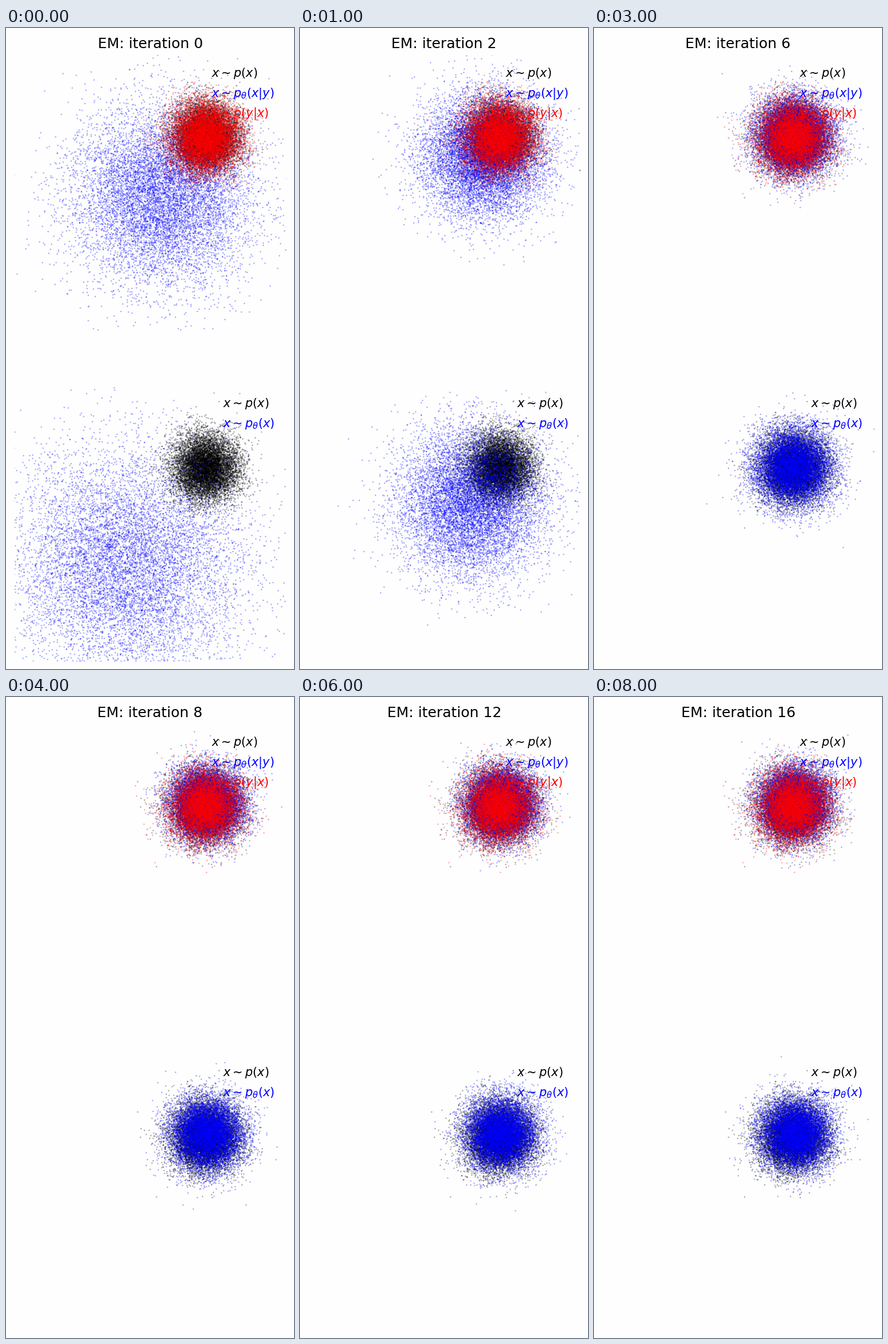
Recreate the animation shown at these times as a matplotlib script. Size 502x1116 px, loop 8500 ms.

```python
import numpy as np
import matplotlib.pyplot as plt
from matplotlib.animation import FuncAnimation

W, H, DPI = 502, 1116, 64
PT = 72 / DPI  # points per pixel
LEFT, RIGHT, PANEL_H = 15, 488, 480
TOP, SHIFT = 47, 575  # first panel's upper edge, offset of the second panel
FRAMES, STEP_MS, N = 17, 500, 10000
CENTER, SPREAD, NOISE = np.array([347, 190]), 29, 7

# Where the fitted clouds settle, and how far off each one starts
FIT_CENTER, FIT_SPREAD = np.array([351, 185]), 30.5
POSTERIOR_START = np.array([-80, 106]), 46
PRIOR_START = np.array([-143, 174]), 67

plt.rcParams["font.family"] = "DejaVu Sans"
fig = plt.figure(figsize=(W / DPI, H / DPI), dpi=DPI, facecolor="#fefefe")


def add_panel(top):
    """Axes whose data units are pixels of the first panel."""
    box = [LEFT / W, 1 - (top + PANEL_H) / H, (RIGHT - LEFT) / W, PANEL_H / H]
    ax = fig.add_axes(box)
    ax.set(xlim=(LEFT, RIGHT), ylim=(TOP + PANEL_H, TOP))
    ax.axis("off")
    return ax


def add_cloud(ax, color, pts=((), ())):
    return ax.plot(*pts, "o", color=color, ms=2.4 * PT, mew=0, alpha=0.37)[0]


def add_labels(ax, x, *rows):
    for k, (text, color) in enumerate(rows):
        ax.text(x, 85 + 34.6 * k, f"${text}$", color=color, size=20.83 * PT,
                va="baseline", zorder=5)


def gauss(rng, center, sigma):
    return rng.normal(0, sigma, (2, N)) + center[:, None]


def decay(i, tau, power):
    return np.exp(-(i / tau) ** power)


def fitted(rng, i, start):
    """Sample a cloud that converges on the data as iterations pass."""
    offset, extra = start
    return gauss(rng, FIT_CENTER + offset * decay(i, 2.0, 1.2),
                 FIT_SPREAD + extra * decay(i, 2.6, 1.3))


rng = np.random.default_rng(4)
data = gauss(rng, CENTER, SPREAD)
noisy = data + rng.normal(0, NOISE, (2, N))

upper, lower = add_panel(TOP), add_panel(TOP + SHIFT)

add_cloud(upper, "black", data)
posterior = add_cloud(upper, "blue")
add_cloud(upper, "red", noisy)
add_labels(upper, 358, (r"x \sim p(x)", "black"),
           (r"x \sim p_\theta(x|y)", "blue"), (r"y \sim p(y|x)", "red"))

add_cloud(lower, "black", data)
prior = add_cloud(lower, "blue")
add_labels(lower, 378, (r"x \sim p(x)", "black"), (r"x \sim p_\theta(x)", "blue"))

title = fig.text(251.2 / W, 1 - 35 / H, "", size=25 * PT, ha="center", va="baseline")


def update(i):
    rng = np.random.default_rng(100 + i)
    posterior.set_data(*fitted(rng, i, POSTERIOR_START))
    prior.set_data(*fitted(rng, i, PRIOR_START))
    title.set_text(f"EM: iteration {i}")
    return posterior, prior, title


anim = FuncAnimation(fig, update, frames=FRAMES, interval=STEP_MS,
                     init_func=lambda: update(0), repeat=True, repeat_delay=0)
plt.show()
```
